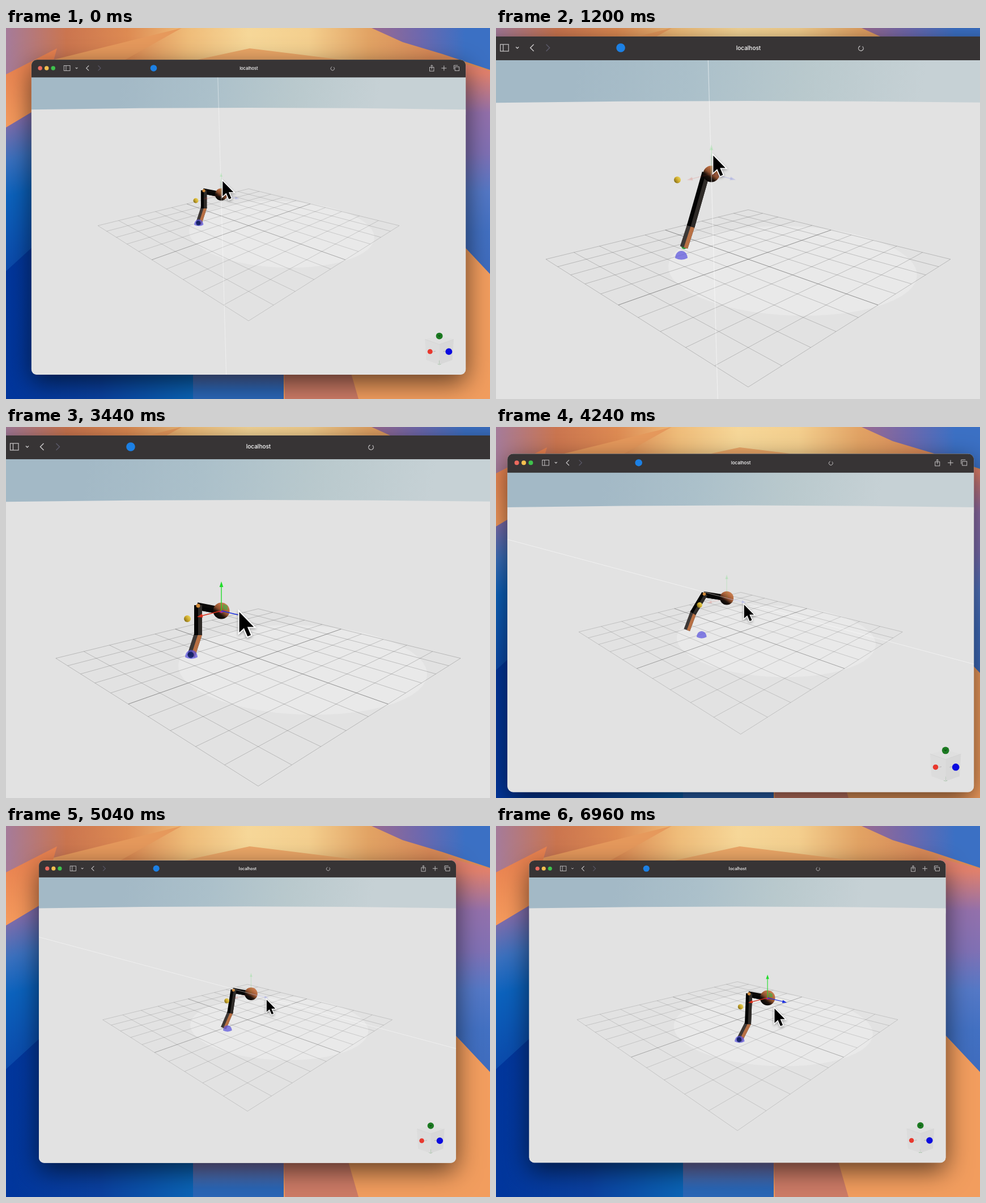
Recreate the animation shown at these times as an HTML page with a canvas. Size 854 by 656 pixels, loop 7040 ms.

```html
<!DOCTYPE html>
<html>
<head>
<meta charset="utf-8">
<style>
html, body { margin: 0; width: 854px; height: 656px; overflow: hidden; }
canvas { display: block; }
</style>
</head>
<body>
<canvas id="stage" width="854" height="656"></canvas>
<script>
const c = document.getElementById('stage').getContext('2d');
const LOOP = 7040, STEP = 80, ZOOM = 1.4;
const FOCAL = 756, SIN = 0.3533, COS = 0.9355, FAR = 14.97, NEAR = 13.49;
const LIFT_END = 3000, SLIDE_START = 3800, SLIDE_END = 6300;
const SLIDE_SLOPE = 0.268, PLUMB_SLOPE = 0.0283;

const clamp = x => Math.max(0, Math.min(1, x));
const ease = (t, from, to) => {
  const x = clamp((t - from) / (to - from));
  return x * x * (3 - 2 * x);
};
const spring = ms => {
  const x = Math.max(0, ms) * 0.0069;
  return 1 - (1 + x) * Math.exp(-x);
};
const add = (a, x, y) => [a[0] + x, a[1] + y];

function trace(points) {
  c.beginPath();
  for (let i = 0; i < points.length; i += 2) c.lineTo(points[i], points[i + 1]);
}
function poly(fill, ...points) {
  trace(points);
  c.fillStyle = fill;
  c.fill();
}
function line(color, width, ...points) {
  trace(points);
  c.strokeStyle = color;
  c.lineWidth = width;
  c.stroke();
}
function disc(fill, x, y, r) {
  c.beginPath();
  c.arc(x, y, r, 0, 7);
  c.fillStyle = fill;
  c.fill();
}
function ramp(x0, y0, x1, y1, ...colors) {
  const g = c.createLinearGradient(x0, y0, x1, y1);
  colors.forEach((k, i) => g.addColorStop(i / (colors.length - 1), k));
  return g;
}

function wallpaper() {
  c.fillStyle = ramp(0, 0, 854, 0, '#a57b9a', '#cb754f', '#dd8a52', '#efbc79', '#f6d798', '#f4cf8e', '#e2a364', '#d98a58', '#d98a58');
  c.fillRect(0, 0, 854, 200);
  poly('#e6995c', 60, 62, 310, 0, 200, 62);
  poly('#eca767', 310, 62, 430, 36, 640, 62);
  poly(ramp(0, 60, 0, 170, '#e98250', '#f59a5c'), 0, 82, 90, 36, 60, 140, 0, 176);
  poly(ramp(645, 0, 810, 0, '#9a6a90', '#6f68ad', '#3b70c4'), 645, 0, 700, 25, 770, 46, 854, 74, 854, 0);
  poly(ramp(0, 80, 0, 430, '#e0806c', '#9370ab', '#8070b4', '#5478c6', '#4270c2', '#3f6cbe'), 780, 56, 854, 76, 854, 440, 780, 360);
  poly(ramp(20, 165, 90, 400, '#7d6cab', '#3a70be', '#0b62bd', '#0b56b4', '#0a4aab'), 0, 176, 60, 140, 60, 656, 0, 656);
  poly(ramp(0, 0, 330, 0, '#00359c', '#0a409f', '#0a64b6'), 0, 430, 60, 375, 60, 580, 330, 580, 330, 656, 0, 656);
  poly(ramp(0, 595, 0, 640, '#6f6ca8', '#4a6aae', '#2a66b6'), 330, 580, 490, 580, 492, 656, 330, 656);
  poly('#f29d5e', 780, 356, 854, 435, 854, 656, 490, 656, 490, 580, 780, 580);
  poly('#cd7b66', 490, 580, 600, 580, 622, 656, 492, 656);
}

function toolbar() {
  const ink = '#c9c7c8';
  c.fillStyle = '#373435';
  c.fillRect(-515, -394, 1030, 42);
  c.save();
  c.translate(0, -374);
  ['#ec6a5e', '#f4bf4f', '#3fc24c'].forEach((k, i) => disc(k, -494 + 15.5 * i, 0, 5));
  const chevron = (color, x, dx) => line(color, 1.5, x, -6, x + dx, 0, x, 6);
  chevron(ink, -378.5, -6);
  chevron('#5a5868', -356.5, 6);
  line(ink, 1.4, -410, -1.5, -407.5, 1, -405, -1.5);
  disc('#1c80e4', -225, 0, 7.8);

  c.strokeStyle = ink;
  c.lineWidth = 1.2;
  c.strokeRect(-437.5, -6, 14.5, 12);
  c.strokeRect(429, -2, 10, 9);
  c.strokeRect(489, -3, 10, 9);
  c.beginPath();
  c.arc(199, 1, 4.3, -0.9, 4.4);
  c.stroke();
  line(ink, 1.2, -432.5, -6, -432.5, 6);
  line(ink, 1.2, 434, 3, 434, -7);
  line(ink, 1.2, 431, -4.5, 434, -7.5, 437, -4.5);
  line(ink, 1.3, 457, 0, 469, 0);
  line(ink, 1.3, 463, -6, 463, 6);
  line(ink, 1.2, 486.5, 3, 486.5, -6.5, 496, -6.5);

  c.fillStyle = '#fff';
  c.font = '500 10px Inter, "Noto Sans", sans-serif';
  c.textAlign = 'center';
  c.textBaseline = 'middle';
  c.fillText('localhost', 0.5, 0.5);
  c.restore();
}

function backdrop() {
  c.fillStyle = ramp(-300, -353, 300, -250, '#a3b9c6', '#abc0ca', '#b9c9cd', '#c6d1d5');
  c.fillRect(-515, -353, 1030, 90);
  c.beginPath();
  c.moveTo(-515, -275.5);
  c.quadraticCurveTo(0, -284.5, 515, -275.5);
  c.lineTo(515, 360);
  c.lineTo(-515, 360);
  c.fillStyle = '#e2e2e2';
  c.fill();
}

function floor(dist) {
  const project = (u, v) => {
    const k = FOCAL / (dist - v * COS);
    return [u * k, v * SIN * k];
  };
  const grid = (x, z) => project((z - x) * Math.SQRT1_2, (x + z) * Math.SQRT1_2);
  const rim = [];
  for (let a = 0; a < 6.28; a += 0.1) rim.push(...project(1.45 + 4.18 * Math.cos(a), 4.15 * Math.sin(a)));
  poly('#e9e9e9', ...rim);
  for (let i = -5; i <= 5; i++) {
    const color = i ? 'rgba(70,70,70,.3)' : 'rgba(50,50,50,.55)';
    line(color, 0.9, ...grid(i, -5), ...grid(i, 5));
    line(color, 0.9, ...grid(-5, i), ...grid(5, i));
  }
}

// Square beam with two visible faces
function beam([ax, ay], [bx, by], width, left, right) {
  c.save();
  c.translate(ax, ay);
  c.rotate(Math.atan2(by - ay, bx - ax));
  const length = Math.hypot(bx - ax, by - ay) + 4;
  c.fillStyle = left;
  c.fillRect(-2, -width / 2, length, width);
  c.fillStyle = right;
  c.fillRect(-2, 0, length, width / 2);
  c.restore();
}

function arrow(color, [x, y], dx, dy) {
  c.save();
  c.translate(x, y);
  c.rotate(Math.atan2(dy, dx));
  const length = Math.hypot(dx, dy);
  line(color, 1.4, 0, 0, length - 6, 0);
  poly(color, length, 0, length - 10, -3.4, length - 10, 3.4);
  c.restore();
}

// Target height and travel, plus the travel at which the foot is planted
function pose(t) {
  const rise = -10 + 77 * ease(t, 0, 1150) - 24 * ease(t, 1250, 2160) - 43 * ease(t, 2160, LIFT_END);
  const slide = 64 * ease(t, SLIDE_START, 4640) + 68 * ease(t, 4640, SLIDE_END);
  const planted = 64 * ease(t, 4400, 4560) + 68 * ease(t, 5760, 5920);
  return { rise, slide, planted, ball: [-65 + slide, -84 - rise + SLIDE_SLOPE * slide] };
}

function robot({ rise, slide, planted, ball }, axis) {
  const [x, y] = ball, r = 14.5 + slide * 0.018;
  const support = s => [-118 + s * 0.93, -6 + s * 0.385];
  const dome = support(slide), lift = Math.max(0, rise - 43) * 0.7;
  const stretch = clamp(rise / 43), lag = slide - planted;
  const foot = add(support(planted), lift * 0.3, -lift);
  const knee = add(foot, 12 + slide * 0.05, -37);
  const hip = add(ball, -41 + 31 * stretch - lag * 0.25, -8 + 8 * stretch);

  if (lift > 1) disc('#2b9a35', foot[0], foot[1], 5);
  beam(hip, ball, 13, '#0b0908', '#050505');
  beam(foot, knee, 14, '#3d3836', '#b87044');
  beam(knee, hip, 14, '#030303', '#2f2b28');
  disc('#d18a3a', hip[0], hip[1] - 1, 3.5);

  const [px, py] = add(ball, -60, 14 + slide * 0.045 - rise * 0.05);
  disc(ramp(px - 5, py + 3, px + 5, py - 4, '#84701a', '#d0ab2e', '#e9d75c'), px, py, 6);

  c.save();
  c.translate(...dome);
  c.beginPath();
  c.moveTo(-11, 4);
  c.bezierCurveTo(-10, -13, 10, -13, 11, 4);
  c.quadraticCurveTo(0, 10, -11, 4);
  c.fillStyle = 'rgba(90,84,222,.72)';
  c.fill();
  c.restore();
  if (Math.hypot(foot[0] - dome[0], foot[1] - dome[1]) < 8) disc('rgba(4,22,86,.8)', foot[0] - 1, foot[1], 5.5);

  disc(ramp(x - r * 0.6, y + r * 0.7, x + r * 0.5, y - r * 0.8, '#0a0706', '#1d120c', '#8d4f2e', '#b56a3f', '#c87f52'), x, y, r);

  const glow = 'rgba(255,255,255,.5)';
  if (axis === 'y') line(glow, 1.2, x - 400 * PLUMB_SLOPE, y - 400, x + 500 * PLUMB_SLOPE, y + 500);
  if (axis === 'z') line(glow, 1.2, x - 700, y - 700 * SLIDE_SLOPE, x + 700, y + 700 * SLIDE_SLOPE);

  c.globalAlpha = axis ? 0.14 : 1;
  if (!axis) {
    poly('rgba(40,190,70,.55)', x + 3, y - 12, x + 11, y - 9, x + 11, y - 1, x + 3, y - 3);
    poly('rgba(200,40,190,.7)', x, y - 1, x + 6, y + 1, x, y + 4, x - 6, y + 1);
  }
  arrow('#d8301c', ball, -43, 11);
  arrow('#1c2ee0', ball, 43, 10.5);
  arrow('#22dc2c', ball, 0, -52);
  c.globalAlpha = 1;
}

function viewCube() {
  c.save();
  c.translate(452, 299);
  disc('#3c9440', 0, 26, 5);
  poly('#dfdfdf', -34, -29, 0, -38, 34, -29, 0, -17);
  poly('#dcdcdc', -34, -29, 0, -17, 0, 31, -31, 20);
  poly('#d8d8d8', 34, -29, 0, -17, 0, 31, 31, 20);
  line('#cfcfcf', 0.8, -34, -29, 0, -17, 34, -29);
  line('#aaa', 1, -14, 0, -9, -1);
  line('#aaa', 1, 9, 0, 14, -1);
  disc('#1c7a22', 0, -37, 8);
  line('#0c4a12', 1.5, -2.5, -39, 0, -36, 2.5, -39);
  disc('#e8382e', -22, 0, 6);
  disc('#0a0ae0', 22.5, 0, 8);
  c.restore();
}

function pointer(t, ball) {
  const leave = ease(t, LIFT_END, 3440), grab = ease(t, 3440, SLIDE_START), rest = ease(t, SLIDE_END, 6700);
  const loose = 1 - ease(t, 0, 200) + ease(t, LIFT_END, 3200) - ease(t, SLIDE_START, 4000) + ease(t, SLIDE_END, 6500);
  const size = 1.34 + 0.26 * loose;
  c.save();
  c.translate(...add(ball, 2 + 28 * leave + 7 * grab - 14 * rest, -35 + 34 * leave + 13 * grab + 6 * rest));
  c.scale(size, size);
  const shape = new Path2D('M1 2V24.5L6.2 19.7L10.2 29L13.8 27.5L9.9 18.4H17Z');
  c.shadowColor = 'rgba(0,0,0,.35)';
  c.shadowBlur = 4;
  c.shadowOffsetY = 2;
  c.strokeStyle = '#fff';
  c.lineWidth = 2.6;
  c.stroke(shape);
  c.shadowColor = 'transparent';
  c.fillStyle = '#000';
  c.fill(shape);
  c.restore();
}

function draw(t) {
  // The screen zoom begins one step before the loop point
  const since = (t + STEP) % LOOP;
  const zoom = 0.4 * (spring(since) - spring(since - 3966));
  const dist = FAR + (NEAR - FAR) * ease(t, 6320, 6920);
  const axis = t < LIFT_END ? 'y' : t >= SLIDE_START && t < SLIDE_END ? 'z' : '';
  const now = pose(t);

  wallpaper();
  c.save();
  c.translate(426 + 47.5 * zoom, 342.4 + 166.4 * zoom);
  c.scale((1 + zoom) / ZOOM, (1 + zoom) / ZOOM);
  c.beginPath();
  c.roundRect(-514.5, -394, 1029, 748, 13);
  c.save();
  c.shadowColor = 'rgba(0,0,0,.6)';
  c.shadowBlur = 45;
  c.shadowOffsetY = 14;
  c.fillStyle = '#e2e2e2';
  c.fill();
  c.restore();
  c.save();
  c.clip();
  backdrop();
  floor(dist);
  c.save();
  c.scale(FAR / dist, FAR / dist);
  robot(now, axis);
  c.restore();
  viewCube();
  toolbar();
  c.restore();
  pointer(t, now.ball);
  c.restore();
}

const start = performance.now();
function tick() {
  const t = (performance.now() - start) % LOOP;
  draw(Math.floor(t / STEP) * STEP);
  requestAnimationFrame(tick);
}
tick();
</script>
</body>
</html>
```
